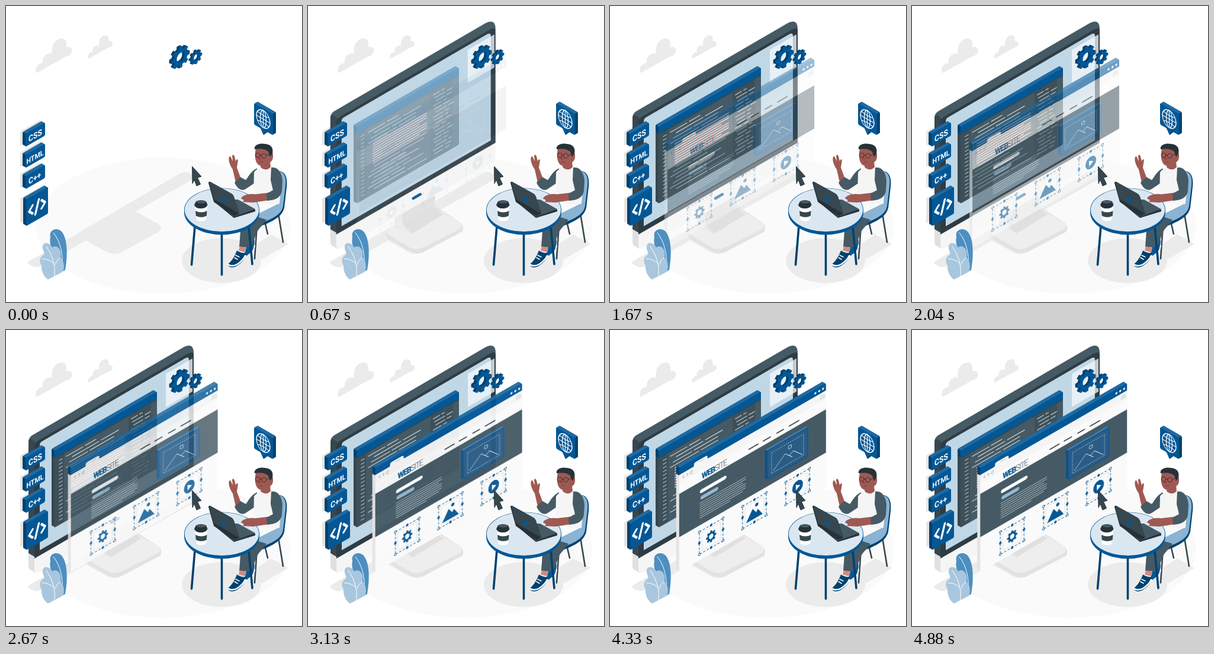
An HTML page for the animation above (4930 ms loop, 500 by 500 pixels).

```html
<!DOCTYPE html>
<html lang="en">
<head>
<meta charset="utf-8">
<title>Web development</title>
<style>
  html, body { margin: 0; width: 100%; height: 100%; overflow: hidden; background: #fff; }
  svg { display: block; width: 100%; height: 100%; }
  text { font-family: Roboto, "Open Sans", sans-serif; }
  .skin { fill: #9f5953; }
  .dark { fill: #37474f; }
  .grey { fill: #455a64; }
  .blue { fill: #045795; }
  .deep { fill: #00426f; }
  .line { fill: none; stroke-linecap: round; stroke-linejoin: round; }
</style>
</head>
<body>
<svg viewBox="0 0 500 500" xmlns="http://www.w3.org/2000/svg">
  <g id="ground">
    <ellipse cx="265" cy="371" rx="215" ry="115" fill="#fafafa"/>
    <path fill="#ebebeb" d="M39 431 L116 387 L292 284 Q301 278 309 282 L315 285 Q321 289 313 294 L219 347 L257 368 Q267 375 257 382 L195 416 Q182 422 169 415 L135 396 L62 438 Q54 443 46 440 L40 437 Q35 434 39 431Z"/>
    <ellipse cx="364" cy="430" rx="67" ry="38" fill="#ebebeb"/>
    <path fill="#ebebeb" d="M420 404 L448 386 L477 402 L432 428Z"/>
    <path id="cloud" fill="#ebebeb" d="M51 113 C48 104 54 97 62 96 C60 86 70 77 78 81 C75 66 84 54 95 55 C101 55 103 62 102 70 C108 67 113 72 111 78 C109 84 104 84 98 87 L54 112Z"/>
    <use href="#cloud" transform="translate(104.3 12.2) scale(.68)"/>
  </g>

  <g id="monitor">
    <path fill="#e2e2e2" d="M136 379 L218 340 L258 366 Q264 371 261 381 L196 415 Q184 421 171 414 L137 394 Q131 390 132 383Z"/>
    <path fill="#eee" d="M138 376 L214 341 L256 365 Q265 371 255 378 L194 408 Q183 413 172 408 L138 388 Q129 382 138 376Z"/>
    <path fill="#e0e0e0" d="M146 350 L214 311 V336 Q215 344 229 352 L177 384 Q158 374 148 376Z"/>
    <path fill="#ebebeb" d="M146 350 L160 342 V366 Q164 376 177 384 Q158 376 148 376Z"/>
    <path fill="#e0e0e0" d="M38 370 L50 376 V410 L41 405 Q38 403 38 399Z"/>
    <path class="grey" d="M38 189 Q38 182 44 178 L300 29 Q309 24 314 28 Q317 31 317 40 V60 L48 220 V382 L38 376Z"/>
    <path class="dark" d="M38 188 Q40 183 44 185 L50 190 V384 L38 377Z"/>
    <path fill="#2e3c44" d="M48 198 Q48 191 54 187 L307 40 Q317 35 317 43 V232 L48 387Z"/>
    <path fill="#f5f5f5" d="M48 386 L317 231 V256 Q317 261 312 264 L58 408 Q48 413 48 404Z"/>
    <path fill="#c0d7e6" d="M57 195 Q57 190 61 188 L304 47 Q309 45 309 50 V227 L57 372Z"/>
    <path fill="#f5f9fb" opacity=".75" d="M270 74 L315 48 V104 L270 130Z"/>
    <path class="line" stroke="#045795" stroke-width="4.5" d="M178 325 L190 318"/>
  </g>

  <g id="code"></g>
  <g id="site"></g>
  <g id="props"></g>

  <g id="leaves">
    <path fill="#4d8fc0" d="M75 390 C72 378 86 373 94 381 C105 394 104 425 100 446 L88 452 C88 430 71 408 75 390Z"/>
    <path class="line" stroke="#fff" d="M80 383 Q98 405 95 446"/>
    <path fill="#a8c7de" d="M71 462 L96 449 C100 439 97 429 92 425 C95 411 86 402 78 408 C74 398 62 399 62 406 C61 413 66 416 64 420 C56 424 56 432 60 438 C59 447 64 458 71 462Z"/>
    <path class="line" stroke="#fff" d="M68 406 Q85 430 82 456 M61 427 Q72 427 80 434 M92 425 Q86 428 83 437"/>
  </g>

  <g id="man">
    <path class="line" stroke="#37474f" stroke-width="2.6" d="M424 370 L420 427 M438 368 L442 385 M460 350 L468 399"/>
    <path class="deep" d="M462 279 C472 280 476 291 474 306 L470 341 C467 354 455 361 440 368 L424 374 C416 373 412 364 416 357 L460 335Z"/>
    <path fill="#8ab3d4" d="M460 279 C471 280 474 291 472 305 L468 338 C466 350 455 357 440 363 L424 371 C416 370 412 362 416 356 L458 335Z"/>
    <path class="blue" d="M405 391 L418 390 Q421 396 419 404 Q419 414 410 421 Q404 423 403 418 Q408 408 405 391Z"/>
    <path class="line" stroke="#fff" stroke-width="2" d="M420 405 Q419 415 409 421"/>
    <path class="grey" d="M396 380 L424 356 L440 361 C432 372 427 376 424 382 L414 408 L394 407Z"/>
    <path fill="#d08a84" d="M395 406 L406 408 L404 416 L393 413Z"/>
    <path class="deep" d="M390 413 Q397 418 405 417 C405 427 398 434 390 439 C384 443 376 442 374 437 C381 431 386 424 390 413Z"/>
    <path class="line" stroke="#fff" stroke-width="2.6" d="M375 437 Q383 441 391 436 Q401 429 404 422"/>
    <path class="line" stroke="#fff" stroke-width="1.6" d="M386 425 L391 428 M388 421 L394 424"/>
    <path class="skin" d="M383 276 C378 269 375 260 377 255 Q379 252 381 258 L383 262 L382 253 Q384 249 386 254 L388 262 Q390 257 392 260 L390 273 L397 292 L388 298Z"/>
    <path class="grey" d="M424 274 C412 280 409 290 405 294 L396 289 L386 298 C390 308 398 314 405 309 L423 297Z"/>
    <path fill="#f5f5f5" d="M419 281 C424 272 446 268 456 273 L465 300 L462 334 C450 338 430 332 418 325Z"/>
    <path class="skin" d="M431 260 L446 262 L447 272 C442 278 434 277 430 272Z"/>
    <path class="skin" d="M422 241 C420 250 420 261 425 267 C430 272 439 271 443 265 C450 264 453 256 450 246 L446 238Z"/>
    <path fill="#263238" d="M420 242 C418 234 430 231 438 233 C449 234 453 242 449 251 L446 255 L443 246 C436 240 428 241 420 242Z"/>
    <g class="line" stroke="#263238" stroke-width=".9">
      <circle cx="425" cy="252" r="3.800"/><circle cx="435.500" cy="253" r="4"/>
      <path d="M429 252 H432 M440 252 L447 250"/>
      <path stroke="#6d332f" d="M429 252 L427 258 H430 M429 264 Q433 262 434 264"/>
    </g>
  </g>

  <g id="table">
    <path class="line" stroke="#00426f" stroke-width="3.6" d="M319 372 L313.500 437 M364.500 382 V454 M410 372 L416 436"/>
    <ellipse class="blue" cx="364.500" cy="348.500" rx="63.500" ry="38"/>
    <ellipse cx="364.500" cy="344.500" rx="63.500" ry="37" fill="#045795"/>
    <ellipse cx="364.500" cy="344.500" rx="62.700" ry="36.500" fill="#dae7f1"/>
    <path fill="#fff" d="M319.500 338 L321.500 361 Q330 366 338 361 L340 338Z"/>
    <path class="dark" d="M320 346 Q330 351 339.500 346 L338.800 354.500 Q330 359 320.800 354.500Z"/>
    <path fill="#263238" d="M318 336 L321 330 Q329 326 338 330 L340.500 336 Q338 342 329 342 Q320 342 318 336Z"/>
    <ellipse class="grey" cx="329.500" cy="331" rx="8" ry="2.600"/>
    <path fill="#263238" d="M351 327 L393 328 L421 344 V347 L385 358 L351 330Z"/>
    <path class="grey" d="M351 326 L392 327 L421 343 L385 356Z"/>
    <path fill="#263238" d="M342 299 Q342 296 345 297 L381 317 Q384 319 385 322 L394 351 L386 355 L351 331Z"/>
    <path class="dark" d="M345 297 L381 317 Q384 319 385 322 L393 350 L351 326 L344 301Z"/>
    <circle class="blue" cx="367" cy="327" r="4"/>
  </g>
  <g id="arm">
    <path class="skin" d="M447 315 L421 318 C410 316 399 320 397 325 L402 328 L400 331 L418 332 L444 328Z"/>
    <path class="grey" d="M448 273 C460 271 466 282 467 295 L466 312 C465 322 456 327 448 328 L441 329 L440 317 L451 311 L447 294Z"/>
  </g>
  <path fill="#37474f" stroke="#263238" d="M314.500 271 L330 288 L323.500 290 L328.500 301 L322 304 L318 293.500 L315 300Z"/>
</svg>
<script>
const LOOP = 4930;
const BLUE = '#045795', DEEP = '#00426f', LIGHT = '#1f6aa3', GREY = '#455a64', WHITE = '#fff';
const byId = id => document.getElementById(id);

function add(parent, tag, attrs, text) {
  const node = document.createElementNS('http://www.w3.org/2000/svg', tag);
  for (const key in attrs) node.setAttribute(key, attrs[key]);
  if (text) node.textContent = text;
  return parent.appendChild(node);
}

// Vertical isometric plane: x keeps its screen length, y slopes with it.
const plane = (parent, x, y, slope = -.577) =>
  add(parent, 'g', { transform: `matrix(1 ${slope} 0 1 ${x} ${y})` });
const rect = (g, x, y, width, height, fill, rx = 0) =>
  add(g, 'rect', { x, y, width, height, fill, rx });
const stroke = (g, d, color, width = 1, extra = {}) =>
  add(g, 'path', { d, class: 'line', stroke: color, 'stroke-width': width, ...extra });
const label = (g, x, y, size, fill, weight, text) =>
  add(g, 'text', { transform: `translate(${x} ${y}) scale(.866 1)`, 'font-size': size, fill, 'font-weight': weight }, text);

// A slab seen from the front with its thickness running up and sideways.
function slab(parent, x, y, w, h, { fill = BLUE, side = DEEP, top = LIGHT, depth = 5, rx = 2, slope = -.577 } = {}) {
  const dir = Math.sign(slope);
  for (let i = depth; i > 0; i--) rect(plane(parent, x + dir * i, y - .577 * i, slope), 0, 0, w, h, side, rx);
  const face = plane(parent, x, y, slope);
  const shift = dir * depth, rise = -1.155 * depth;
  add(face, 'path', { d: `M1 1L${1 + shift} ${rise}H${w - 1 + shift}L${w - 1} 1Z`, fill: top });
  rect(face, 0, 0, w, h, fill, rx);
  return face;
}

function gearPath(r, teeth = 8) {
  const pts = [];
  const step = 2 * Math.PI / teeth;
  for (let i = 0; i < teeth; i++) {
    [[-.32, .76], [-.22, 1], [.22, 1], [.32, .76]].forEach(([a, k]) => {
      const t = (i + a) * step;
      pts.push((r * k * Math.cos(t)).toFixed(2) + ' ' + (r * k * Math.sin(t)).toFixed(2));
    });
  }
  const h = r * .42;
  return `M${pts.join('L')}ZM${h} 0A${h} ${h} 0 1 0 ${-h} 0A${h} ${h} 0 1 0 ${h} 0Z`;
}
const gear = (parent, x, y, r, fill) =>
  add(parent, 'path', { d: gearPath(r), fill, 'fill-rule': 'evenodd', transform: `matrix(.866 -.5 0 1 ${x} ${y})` });

function drawCode(root) {
  slab(root, 82, 204, 173, 130, { fill: GREY, side: '#37474f' });
  slab(root, 82, 204, 173, 13);
  const f = plane(root, 82, 204);
  rect(f, 0, 12, 173, 2, '#37474f');
  rect(f, 0, 14, 16, 115, '#3d5059');
  rect(f, 125, 14, 38, 115, '#3d5059');
  for (let i = 0; i < 17; i++) {
    const v = 21 + i * 6.3;
    stroke(f, `M8 ${v}h5`, '#90a4ae', 1.800);
    stroke(f, `M${130 + i % 3 * 2} ${v}h${10 + i * 7 % 9}m4 0h${4 + i * 5 % 7}`, '#a3b2b9', 1.800);
    if (i < 4 || i > 9) {
      const indent = 20 + i * 5 % 3 * 5;
      stroke(f, `M${indent} ${v}h${28 + i * 17 % 31}m4 0h${18 + i * 11 % 23}`, '#cfd8dc', 1.300);
    }
  }
  for (let i = 0; i < 9; i++) stroke(f, `M28 ${45 + i * 4.100}h${i % 4 === 3 ? 78 : 90}`, '#edc1ba', 1.800);
}

function drawImageFrame(root) {
  const f = slab(root, 263, 204, 70, 50, { fill: '#2a5c86', side: '#0d4f85', top: '#3f7cab', depth: 3, rx: 3 });
  add(f, 'rect', { x: 1, y: 1, width: 68, height: 48, rx: 3, fill: 'none', stroke: '#0f5690', 'stroke-width': 1.500 });
  add(f, 'rect', { x: 8, y: 8, width: 54, height: 35, fill: 'none', stroke: '#c0d7e6', 'stroke-width': .8, 'stroke-dasharray': '2 1.5' });
  stroke(f, 'M11 40L31 23L43 35M38 30L45 26L60 41', '#dce9f2', .8);
  add(f, 'circle', { cx: 39, cy: 16, r: 2.800, fill: 'none', stroke: '#dce9f2', 'stroke-width': .8 });
}

function drawWidget(root, x, y, icon) {
  const g = plane(root, x, y);
  add(g, 'rect', { x: 0, y: 0, width: 40, height: 38, fill: 'none', stroke: BLUE, 'stroke-dasharray': '3.5 2.5' });
  add(g, 'rect', { x: 4, y: 4, width: 32, height: 30, fill: 'none', stroke: '#9ba9b1', 'stroke-width': .5, 'stroke-dasharray': '1 1' });
  for (const cx of [0, 20, 40]) for (const cy of [0, 19, 38]) {
    if (cx === 20 && cy === 19) continue;
    const mid = cx === 20 || cy === 19;
    add(g, 'circle', { cx, cy, r: 1.700, fill: mid ? BLUE : WHITE, stroke: BLUE, 'stroke-width': .9 });
  }
  icon(g);
}

function drawSite(root) {
  slab(root, 115, 233, 248, 176, { fill: '#fafafa', side: '#e4e4e4' });
  const f = slab(root, 115, 233, 248, 14);
  rect(f, 0, 12, 248, 7, '#fafafa');
  add(f, 'path', { d: 'M0 26V13H22Q25 13 25 10V9Q25 6 28 6H45Q48 6 48 9V13H248V26Z', fill: '#f5f5f5' });
  stroke(f, 'M34 9.500h8', '#b0bec5', .8);
  stroke(f, 'M8 17l-2 2 2 2M13 17l2 2-2 2M23 18a2.200 2.200 0 1 0 0 3', '#9aa5ab', .9);
  rect(f, 0, 26, 248, 18, '#fafafa');
  for (let i = 0; i < 3; i++) {
    add(f, 'ellipse', { cx: 230 + i * 6.500, cy: 6.500, rx: 1.600, ry: 1.900, fill: WHITE });
    stroke(f, `M238 ${17 + i * 2.600}h8`, '#c4c9cc', 1);
  }
  [[118, 15], [142, 12], [165, 11], [186, 16]].forEach(([u, w]) => stroke(f, `M${u} 36.500h${w}`, '#37474f', 2));

  rect(f, 0, 44, 248, 73, GREY);
  const title = label(f, 38, 41, 14, BLUE, 900, 'WEB');
  add(title, 'tspan', { 'font-weight': 300, fill: '#37474f' }, 'SITE');
  title.setAttribute('letter-spacing', '-1.2');
  rect(f, 35, 58, 45, 6, WHITE, 3);
  rect(f, 36, 69, 30, 6, '#94bad6', 3);
  for (let i = 0; i < 8; i++) stroke(f, `M35 ${80 + i * 3.600}h${[77, 77, 72, 77][i % 4] - (i > 6 ? 26 : 0)}`, '#b7c3c9', 1);

  drawImageFrame(root);
  drawWidget(root, 149, 341, g => add(g, 'path', {
    d: gearPath(10), fill: BLUE, 'fill-rule': 'evenodd', transform: 'translate(20 19) scale(.866 1)' }));
  drawWidget(root, 222, 298, g => {
    add(g, 'path', { d: 'M6 32L17 14L23 23L26 19L34 32Z', fill: BLUE });
    add(g, 'circle', { cx: 24, cy: 10.500, r: 2.800, fill: BLUE });
  });
  drawWidget(root, 295, 257, g => {
    add(g, 'ellipse', { cx: 20, cy: 19, rx: 9, ry: 10.300, fill: BLUE });
    add(g, 'path', { d: 'M17 14.500V24L24.500 19Z', fill: WHITE });
  });
}

function drawBadges(root) {
  [['CSS', 5, 14], ['HTML', 1.500, 12.300], ['C++', 5, 14]].forEach(([name, x, size], i) => {
    const y = 216 + i * 35.700;
    rect(plane(byId('ground'), 24, y - 4), 0, 0, 34, 24, '#e4e4e4', 2);
    label(slab(root, 33, y, 33, 22), x, 17, size, WHITE, 700, name);
  });
  rect(plane(byId('ground'), 24, 325), 0, 0, 38, 42, '#e4e4e4', 2);
  const f = slab(root, 34, 327, 37, 45);
  stroke(f, 'M11 16L5 23L11 30M26 16L32 23L26 30M21.500 12L15.500 34', WHITE, 3.600);
}

function drawGlobe(root) {
  add(root, 'path', { d: 'M429 203L435 218L443 212Z', fill: DEEP });
  const f = slab(root, 419, 164, 32, 36, { slope: .577 });
  add(f, 'path', { d: 'M10 35L15.500 43.500L21 35Z', fill: BLUE });
  for (const rx of [11.500, 5]) add(f, 'ellipse', { cx: 15.500, cy: 18, rx, ry: 14.500, fill: 'none', stroke: WHITE, 'stroke-width': 1.300 });
  stroke(f, 'M15.500 3.500V32.500M4 18H27M6 10.500Q15.500 13.500 25 10.500M6 25.500Q15.500 22.500 25 25.500', WHITE, 1.200);
}

function drawGears(root) {
  [[295, 86.500, 18, 4], [321.500, 86.500, 11.500, 3]].forEach(([x, y, r, depth]) => {
    for (let i = depth; i > 0; i--) gear(root, x - i, y - .3 * i, r, DEEP);
    gear(root, x, y, r, BLUE);
  });
}

drawCode(byId('code'));
drawSite(byId('site'));
const props = byId('props');
drawBadges(props);
drawGlobe(props);
drawGears(props);

function play(id, ms, from, to, easing) {
  byId(id).animate([
    { ...from, easing, offset: 0 },
    { ...to, offset: ms / LOOP },
    { ...to, offset: 1 }
  ], { duration: LOOP, iterations: Infinity });
}
const overshoot = 'cubic-bezier(.36, -.01, .5, 1.38)';
const away = { transform: 'translateX(-30px)', opacity: 0 };
const home = { transform: 'translateX(0px)', opacity: 1 };
play('monitor', 1000, away, home, overshoot);
play('code', 1600, { opacity: 0 }, { opacity: 1 }, 'linear');
play('site', LOOP, away, home, overshoot);
</script>
</body>
</html>
```
